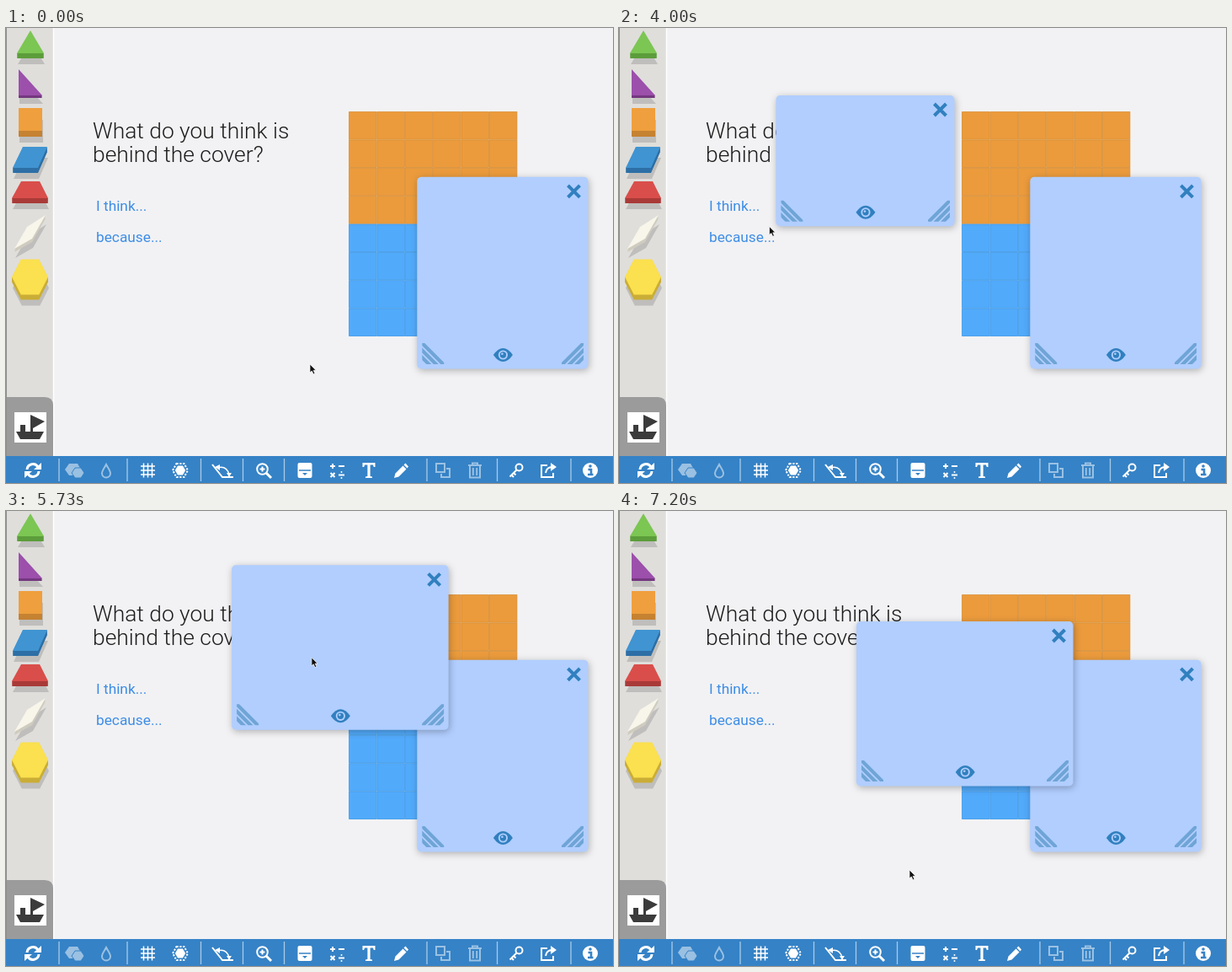
An HTML page that plays this animation: 721 px wide and 540 px high, repeating every 8000 ms.

```html
<!DOCTYPE html>
<html lang="en">
<head>
<meta charset="utf-8">
<title>Cover demo</title>
<style>
html, body { margin: 0; width: 100%; height: 100%; overflow: hidden; background: #f2f2f4; }
svg { display: block; }
text { font-family: Roboto, "Open Sans", sans-serif; }
.title { font-size: 26.4px; font-weight: 350; fill: #1c1c1c; }
.prompt { font-size: 17.3px; fill: #3d8de6; }
.cover { filter: drop-shadow(1px 2px 4px rgba(0, 0, 0, .28)); }
.line { fill: none; stroke: #fff; stroke-width: 2; }
.bold { stroke-width: 3; }
.thin { stroke-width: 1.5; }
.solid { fill: #fff; }
.off { opacity: .5; }
</style>
</head>
<body>
<svg width="721" height="540" viewBox="0 0 721 540">
  <defs>
    <clipPath id="corner"><path d="M0-25H26V0H0Z"/></clipPath>
    <g id="grip">
      <path clip-path="url(#corner)" d="M-2-27 27 2M-2-18.5 20 3.5M-2-10 14 6" stroke="#6fa5d6" stroke-width="4.2"/>
    </g>
    <path id="close" d="M-7-7 7 7M7-7-7 7" stroke="#3180bf" stroke-width="4"/>
    <g id="eye">
      <path d="M-11.5 0Q-6-8 0-8T11.5 0Q6 8 0 8T-11.5 0Z" fill="#3180bf"/>
      <circle r="5.6" fill="#b1ceff"/><circle r="3.7" fill="#3180bf"/>
      <circle cx="-1" cy="-1.2" r="1.3" fill="#b1ceff"/>
    </g>
  </defs>

  <rect width="721" height="540" fill="#f2f2f4"/>
  <text class="title" x="103" y="131">What do you think is</text>
  <text class="title" x="103" y="159">behind the cover?</text>
  <text class="prompt" x="107" y="217">I think...</text>
  <text class="prompt" x="107" y="254">because...</text>
  <g id="tiles"></g>

  <rect width="56" height="508" fill="#dfdedb"/>
  <path d="M56.5 0V508" stroke="#fff" stroke-width="1.5"/>
  <g id="blocks"></g>
  <path d="M0 438H46Q56 438 56 448V508H0Z" fill="#9b9b9c"/>
  <path d="M.5 0V508" stroke="#8f8f90"/>
  <rect x="10" y="456" width="38" height="36" fill="#fff"/>
  <path d="M12 479H17V471H23V479H29V459L46 467 32 475V479H45L40 488H17Z" fill="#3b3b3c"/>

  <rect y="508" width="721" height="32" fill="#3582c6"/>
  <g id="seps" stroke="#a9cbe9" stroke-width="1.3"></g>
  <g transform="translate(32 525)">
    <path class="line bold" d="M-7-1A7 7 0 0 1 6-4M7 1A7 7 0 0 1-6 4"/>
    <path class="solid" d="M1-1H10V-9ZM-1 1H-10V9Z"/>
  </g>
  <g class="off" transform="translate(81 525)">
    <path class="solid" d="M-6-8H4L8-1 4 6H-6L-11-1Z"/>
    <path class="solid" d="M1-3H8L12 3 8 9H1L-3 3Z" stroke="#3582c6"/>
  </g>
  <path class="line off" transform="translate(119 525)" d="M0-7C2-3 5 0 5 3.5A5 5 0 0 1-5 3.5C-5 0-2-3 0-7Z"/>
  <path class="line thin" transform="translate(168.5 525)" d="M-5-8.5V8.500M0-8.5V8.5M5-8.5V8.5M-8.5-5H8.5M-8.5 0H8.5M-8.5 5H8.5"/>
  <g transform="translate(207 525)">
    <path class="line" stroke-dasharray="2.2 1.6" d="M-4.5-8H4.5L9 0 4.5 8H-4.5L-9 0Z"/>
    <path class="solid" d="M-3-5.5H3L6.2 0 3 5.5H-3L-6.2 0Z"/>
  </g>
  <g transform="translate(257 525)">
    <path class="line" d="M-12-7 0 8H13"/>
    <path class="line thin" d="M-6-3Q5-6 8 5"/>
    <path class="solid" d="M-9-4-3-7-3 0ZM5 3H11L8 8Z"/>
  </g>
  <g transform="translate(306 525)" class="line">
    <circle cx="-1.5" cy="-1.5" r="6.3"/><path d="M-4.5-1.5H1.5M-1.5-4.5V1.5"/>
    <path class="bold" d="M3 3 9 9"/>
  </g>
  <g transform="translate(355 525)">
    <rect class="solid" x="-8.5" y="-9" width="17" height="18" rx="2"/>
    <path d="M-7 0H7" stroke="#3582c6" stroke-width="1.5"/>
    <path d="M-3 3H3L0 6Z" fill="#3582c6"/>
  </g>
  <g transform="translate(393 525)" class="line">
    <path d="M-8-5H-2M-5-8V-2M2-5H9M-7.5 3-2.5 8M-2.5 3-7.5 8M2 5.5H9"/>
    <path stroke-linecap="round" d="M5.5 2V2.1M5.5 9V9.1"/>
  </g>
  <path class="solid" transform="translate(431 525)" d="M-7.5-9H7.5V-4H5.8L5-6.5H1.6V7L4 7.5V9H-4V7.5L-1.6 7V-6.5H-5L-5.8-4H-7.5Z"/>
  <path class="solid" transform="translate(469 525)" d="M-8 9-6.5 3.5 2.5-5.5 6.5-1.5-2.5 7.5ZM3.5-6.5 5.5-8.5 9-4.5 7.5-2.5Z"/>
  <path class="line off" transform="translate(519 525)" d="M-8-8H2V2H-8ZM4-2H8V8H-2V4"/>
  <path class="line off" transform="translate(557 525)" d="M-8-6H8M-3-6V-8.5H3V-6M-6-6V8.5H6V-6M-2.2-3V6M2.2-3V6"/>
  <g class="line" transform="translate(606 525)">
    <circle cx="3.5" cy="-3.5" r="4"/>
    <path d="M.5-.5-7.5 7.5M-6 5-3 8M-3.5 2.5-.5 5.5"/>
  </g>
  <g transform="translate(644 525)">
    <path class="line" d="M-1-6H-8V8H6V3M-3 3Q-2-4 5-4"/>
    <path class="solid" d="M3-9 10-4 3 1Z"/>
  </g>
  <g transform="translate(694 525)">
    <circle class="solid" r="9"/>
    <path d="M-2.5-1H1V5M-3 5H3.5" fill="none" stroke="#3582c6" stroke-width="2.6"/>
    <circle cy="-5" r="1.8" fill="#3582c6"/>
  </g>

  <g id="covers"></g>
  <g id="pointer">
    <path id="arrow" d="M0 0V10L2.3 8 4.1 11.8 5.9 11 4.2 7.3H7.2Z" fill="#111" stroke="#fff" stroke-width=".7"/>
    <path id="hand" d="M-1 0Q1-1.5 2 1V4Q6 3 8 6V9L6 12H0L-4 7Q-3 5-1 7Z" fill="#fff" stroke="#222" stroke-width="1.1"/>
  </g>
</svg>
<script>
const $ = id => document.getElementById(id);
const add = (parent, tag, attrs) => {
  const el = document.createElementNS('http://www.w3.org/2000/svg', tag);
  for (const k in attrs) el.setAttribute(k, attrs[k]);
  return parent.appendChild(el);
};
const clamp = v => Math.max(0, Math.min(1, v));

const cell = 33.35, edge = .8;
for (let i = 0; i < 48; i++) {
  const top = i < 24;
  const x = 407.2 + i % 6 * cell, y = 99.2 + Math.floor(i / 6) * cell;
  add($('tiles'), 'rect', {
    x: x + edge / 2, y: y + edge / 2, width: cell - edge, height: cell - edge,
    fill: top ? '#eb9b3c' : '#52aafb', stroke: top ? '#d98d32' : '#3f9ae6', 'stroke-width': edge
  });
}

// A block is its face, a side made of stacked copies, and a shadow
function block(points, depth, face, side) {
  const layer = (dx, dy, fill) => add($('blocks'), 'polygon', { points, fill, transform: `translate(${dx} ${dy})` });
  layer(1, depth + 7, '#bfbebc');
  for (let d = depth; d > 0; d--) layer(0, d, side);
  layer(0, 0, face);
}
const slab = (top, l1, r1, bottom, l2, r2) => [[l1, top], [r1, top], [r2, bottom], [l2, bottom]].join(' ');
const hexagon = (x, y, rx, ry) =>
  [0, 1, 2, 3, 4, 5].map(n => [x + rx * Math.cos(n * Math.PI / 3), y + ry * Math.sin(n * Math.PI / 3)]).join(' ');

block(slab(3, 29, 29, 30, 13, 45), 6, '#7cc653', '#5c9d3b');
block(slab(49, 15, 15, 80, 15, 43), 3, '#9c4fab', '#74387f');
block(slab(95, 15, 43, 122, 15, 43), 7, '#ef9f3d', '#c58231');
block(slab(141, 20, 49, 166, 8, 38), 6, '#4094d2', '#2d6fa6');
block(slab(182, 18, 40, 202, 7, 50), 6, '#d94e4b', '#a93a38');
block('47,222 31,250 10,262 25,236', 4, '#f8f5ea', '#cfccbf');
block(hexagon(28.5, 295.5, 21.5, 24.3), 6, '#fbe04f', '#c9ae37');

[63, 144, 231.5, 281.5, 330.5, 500, 583.5, 671].forEach(x => add($('seps'), 'path', { d: `M${x} 511V538` }));

function makeCover() {
  const root = add($('covers'), 'g', { class: 'cover' });
  const body = add(root, 'rect', { rx: 5, fill: '#b1ceff' });
  const [left, right, eye, close] = ['grip', 'grip', 'eye', 'close'].map(n => add(root, 'use', { href: '#' + n }));
  const move = (el, x, y, extra = '') => el.setAttribute('transform', `translate(${x} ${y})${extra}`);
  return {
    root,
    place([x, y, w, h]) {
      move(root, x, y);
      body.setAttribute('width', w);
      body.setAttribute('height', h);
      move(left, 6, h - 5.5);
      move(right, w - 5.5, h - 5.5, ' scale(-1 1)');
      move(eye, w / 2 + .5, h - 16.5);
      move(close, w - 17, 17);
    }
  };
}

// Sine easing between [step, value] turning points
function swing(turns, s) {
  const next = turns.findIndex(turn => turn[0] > s);
  if (next < 0) return turns[turns.length - 1][1];
  if (next === 0) return turns[0][1];
  const [[s0, a], [s1, b]] = turns.slice(next - 1, next + 1);
  return a + (b - a) * (1 - Math.cos(Math.PI * (s - s0) / (s1 - s0))) / 2;
}

const dragX = [[71, 141], [77, 96], [83, 328], [86.5, 265], [91, 130], [98, 339], [103, 282]];
const dragY = [[71, 80], [81, 273], [86.5, 60], [94, 226], [102.5, 131]];
const freeX = [[4, 361], [9, 338], [12, 353], [28, 353], [41, 341], [43, 335], [66, 149], [70, 243], [103, 384], [108, 345]];
const freeY = [[4, 399], [12, 526], [28, 526], [41, 122], [43, 120], [46, 120], [48, 124], [66, 262], [70, 192], [103, 243], [108, 426]];

function coverBox(s) {
  const grow = Math.sin(Math.PI / 2 * clamp((s - 54) / 11));
  return [
    swing(dragX, s) + 186 * (1 - grow), swing(dragY, s),
    71.5 + 186 * grow, 57.5 + 138 * grow ** 1.23
  ];
}

// While dragging, the cover trails the pointer by one step
function pointerAt(s) {
  const [x, y, , h] = coverBox(s + 1);
  if (s >= 53 && s < 66) return [x + 8, y + h - 13.5];
  if (s >= 70 && s <= 103) return [x + 102, y + 112];
  return [swing(freeX, s), swing(freeY, s)];
}

makeCover().place([488.3, 176.8, 203.2, 227.7]);
const cover = makeCover();

function draw(now) {
  const s = Math.floor((now % 8000 + 7) * 15 / 1000) % 120;
  cover.root.setAttribute('opacity', clamp((s - 14) / 3));
  cover.place(coverBox(s));
  const [x, y] = pointerAt(s), overBar = y > 508;
  $('pointer').setAttribute('transform', `translate(${x} ${y})`);
  $('hand').style.display = overBar ? '' : 'none';
  $('arrow').style.display = overBar ? 'none' : '';
}

const start = performance.now();
function loop() {
  draw(performance.now() - start);
  requestAnimationFrame(loop);
}
loop();
</script>
</body>
</html>
```
